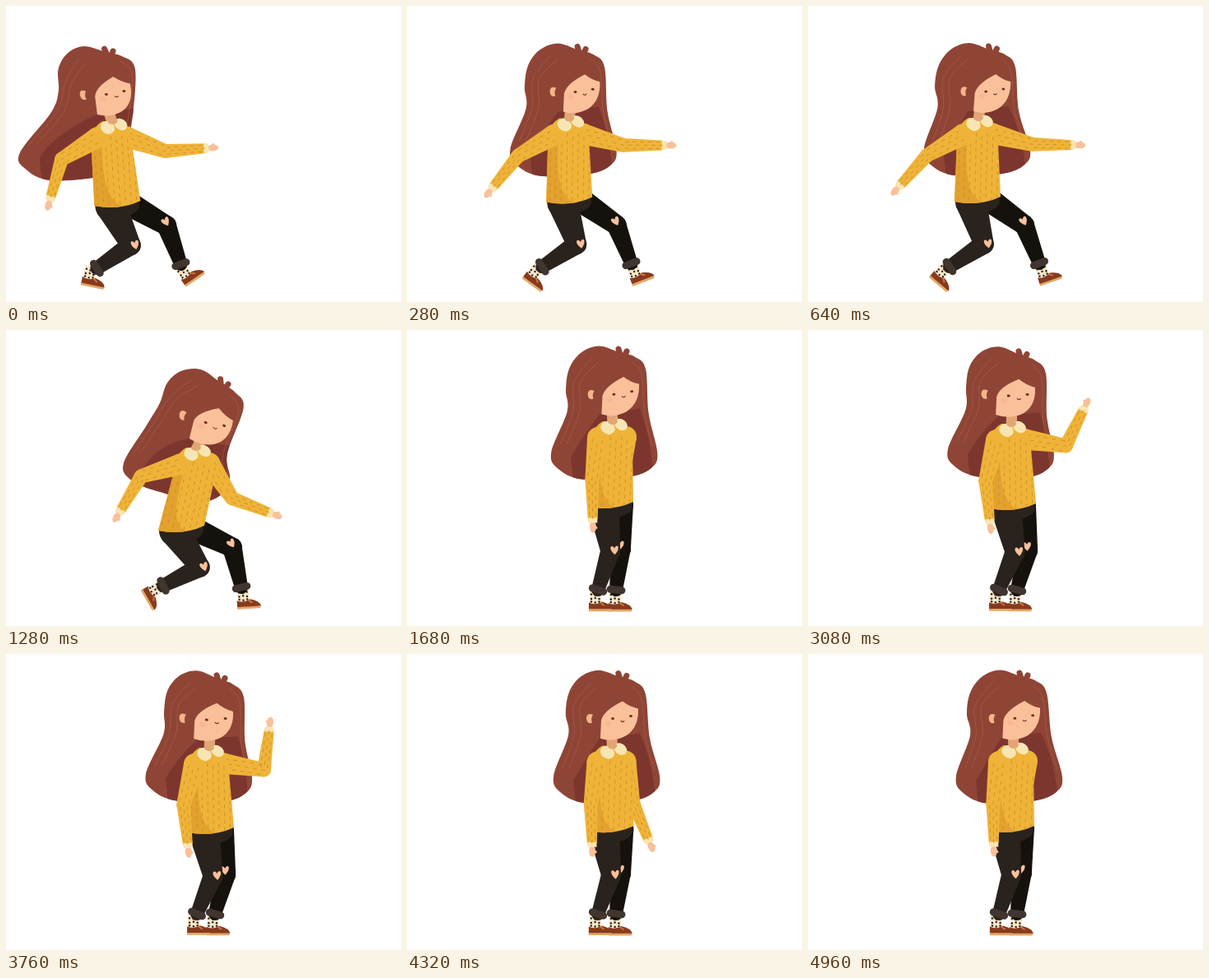
An HTML page with a canvas that plays this animation: 480 px wide and 360 px high, repeating every 5 s.

```html
<!DOCTYPE html>
<html>
<head>
<meta charset="utf-8">
<style>
  html, body { margin: 0; height: 100%; overflow: hidden; background: #fff; }
  canvas { display: block; }
</style>
</head>
<body>
<canvas id="stage" width="480" height="360"></canvas>
<script>
const ctx = document.getElementById('stage').getContext('2d');
const LOOP = 5000;
const HAIR = '#8f4536', HAIR_DARK = '#7c362e', STRAND = 'rgba(178,104,80,.6)';
const SKIN = '#fac09a', NECK = '#e2a675', CREAM = '#f7e6b4', FEATURE = '#6b3022';
const KNIT = '#efb338', KNIT_SHADE = '#e3a12e', STITCH = '#c48a26';
const NEAR_PANTS = '#2a221d', FAR_PANTS = '#15120d', CUFF = '#41352f';

// head is relative to the neck; arms are [upper, fore] angles in degrees;
// feet are [ankle x, ankle y, angle]; drag swings the hair tips sideways
const slide = {
  neck: [130, 146], hips: [135, 240], head: [2, -41], tilt: -.04, lean: .17, turn: 0, drag: -35,
  nearArm: [149, 106], farArm: [20, -4], nearFoot: [110, 319, .2], farFoot: [212, 314, -.6]
};
const skid = {
  neck: [208, 142], hips: [206, 235], head: [14, -40], tilt: 0, lean: -.03, turn: 4, drag: 0,
  nearArm: [150, 132], farArm: [15, 1], nearFoot: [172, 317, .7], farFoot: [281, 313, -.33]
};
const crouch = {
  neck: [232, 149], hips: [213, 241], head: [22, -35], tilt: .31, lean: -.2, turn: 0, drag: -30,
  nearArm: [163, 121], farArm: [57, 21], nearFoot: [191, 311, 1.05], farFoot: [286, 313, -.06]
};
const stand = {
  neck: [251, 117], hips: [247, 212], head: [10, -41], tilt: -.02, lean: 0, turn: 1, drag: 0,
  nearArm: [98, 89], farArm: [95, 100], nearFoot: [232, 316, 0], farFoot: [254, 316, 0]
};
const wave = {
  ...stand, neck: [248, 120], hips: [249, 214], head: [12, -41], tilt: .06, turn: -4, drag: -9,
  nearArm: [105, 84], farArm: [9, -78]
};

const blend = (a, b, k) => typeof a === 'number' ? a + (b - a) * k
  : Array.isArray(a) ? a.map((v, i) => blend(v, b[i], k))
  : Object.fromEntries(Object.keys(a).map(key => [key, blend(a[key], b[key], k)]));
const progress = (time, from, to) => Math.max(0, Math.min(1, (time - from) / (to - from)));
const smooth = u => u * u * (3 - 2 * u);

function poseAt(time) {
  const rise = smooth(progress(time, 1280, 1640));
  const raise = smooth(progress(time, 2280, 2640)) - smooth(progress(time, 4000, 4440));
  let pose = blend(slide, skid, 1 - (1 - progress(time, 0, 560)) ** 3);
  pose = blend(pose, crouch, progress(time, 600, 1280) ** 5);
  pose = blend(pose, stand, rise);
  pose = blend(pose, wave, raise);
  // The waving forearm and the hair are damped pendulums
  const swing = time - 3080, settle = time - 1640;
  pose.farArm[1] += raise * 14 * Math.exp(-swing / 680) * Math.cos(swing / 480 * 2 * Math.PI);
  pose.drag -= rise * 6 * Math.exp(-Math.max(0, settle) / 400) * Math.cos(settle / 250 * Math.PI);
  return pose;
}

const add = (p, x, y) => [p[0] + x, p[1] + y];
const mix = (p, q, k) => blend(p, q, k);
const polar = (p, length, degrees) => {
  const a = degrees * Math.PI / 180;
  return add(p, length * Math.cos(a), length * Math.sin(a));
};
const unit = (p, q) => {
  const d = Math.hypot(q[0] - p[0], q[1] - p[1]);
  return [(q[0] - p[0]) / d, (q[1] - p[1]) / d];
};

// Knee of a two-bone leg, bending forward
function kneeOf(hip, ankle, thigh = 54, shin = 50) {
  const [x, y] = unit(hip, ankle);
  const d = Math.hypot(ankle[0] - hip[0], ankle[1] - hip[1]);
  const along = (thigh ** 2 - shin ** 2 + d * d) / (2 * d);
  const out = Math.sqrt(Math.max(9, thigh ** 2 - along ** 2));
  return add(hip, x * along + y * out, y * along - x * out);
}

function fill(color, path) {
  ctx.fillStyle = color;
  path ? ctx.fill(path) : ctx.fill();
}

function ellipse(p, rx, ry, color, angle = 0) {
  ctx.beginPath();
  ctx.ellipse(...p, rx, ry, angle, 0, 7);
  fill(color);
}

function line(p, q, width, color, cap = 'round') {
  ctx.beginPath();
  ctx.moveTo(...p);
  ctx.lineTo(...q);
  ctx.lineWidth = width;
  ctx.lineCap = cap;
  ctx.strokeStyle = color;
  ctx.stroke();
}

// Smooth curve through points
function spline(points, closed) {
  const path = new Path2D(), n = points.length;
  const at = i => closed ? points[(i + n) % n] : points[Math.max(0, Math.min(n - 1, i))];
  path.moveTo(...points[0]);
  for (let i = 0; i < (closed ? n : n - 1); i++) {
    const [a, b, c, d] = [at(i - 1), at(i), at(i + 1), at(i + 2)];
    path.bezierCurveTo(b[0] + (c[0] - a[0]) / 6, b[1] + (c[1] - a[1]) / 6,
      c[0] - (d[0] - b[0]) / 6, c[1] - (d[1] - b[1]) / 6, ...c);
  }
  return path;
}

function taper(a, ra, b, rb, color) {
  const [x, y] = unit(a, b);
  ctx.beginPath();
  ctx.moveTo(a[0] - y * ra, a[1] + x * ra);
  ctx.lineTo(b[0] - y * rb, b[1] + x * rb);
  ctx.lineTo(b[0] + y * rb, b[1] - x * rb);
  ctx.lineTo(a[0] + y * ra, a[1] - x * ra);
  fill(color);
  ellipse(a, ra, ra, color);
  ellipse(b, rb, rb, color);
}

// Staggered stitches along a -> b
function stitches(a, b, half, rows, cols) {
  const [x, y] = unit(a, b);
  for (let r = 0; r < rows; r++) {
    for (let c = 0; c < cols; c++) {
      const side = ((c + .5) / cols * 2 - 1) * half;
      const p = add(mix(a, b, (r + .3 + c % 2 * .45) / rows), -y * side, x * side);
      line(p, add(p, x * 3.5, y * 3.5), .8, STITCH);
    }
  }
}

function drawHair(place, center, { drag, tilt }) {
  const L = add(center, drag - 81, 71 - tilt * 75), R = add(center, drag + 48, 73 - tilt * 25);
  const leftWaist = add(place(-64, 22), drag / 2, 0);
  const rightWaist = add(place(35, 26), drag / 2, 0);
  const shape = spline([
    place(-28, -57), place(-50, -49), place(-64, -30), place(-68, -4), leftWaist,
    L, add(L, 8, 20), add(L, 37, 33), add(R, -34, 29), add(R, -7, 18), R,
    rightWaist, place(29, -28), place(16, -43), place(-3, -49)
  ], true);
  fill(HAIR, shape);
  line(place(-1, -43), place(-4, -53), 7, HAIR);
  line(place(2, -42), place(6, -50), 7, HAIR);

  ctx.save();
  ctx.clip(shape);
  const top = place(-27, 26), side = place(22, 20);
  ctx.beginPath();
  ctx.moveTo(...top);
  ctx.quadraticCurveTo(L[0] + 40, L[1] - 22, L[0] + 24, L[1] + 6);
  ctx.lineTo(...add(L, 28, 45));
  ctx.lineTo(...add(R, -4, 45));
  ctx.quadraticCurveTo(R[0] - 6, R[1] - 14, ...side);
  fill(HAIR_DARK);
  ctx.lineWidth = .8;
  ctx.strokeStyle = STRAND;
  for (const d of [7, 15]) {
    ctx.stroke(spline([place(-44 + d, -46 + d * .6), place(-65 + d, -14),
      add(leftWaist, d, 0), add(L, d + 4, -10)]));
  }
  ctx.stroke(spline([place(12, -38), place(24, -22), add(rightWaist, -5, 0), add(R, -6, -8)]));
  ctx.restore();
}

function drawFoot(p, angle) {
  ctx.save();
  ctx.translate(...p);
  ctx.rotate(angle);
  ctx.fillStyle = '#f5e6c8';
  ctx.fillRect(-7, -8, 14, 17);
  for (let i = 0; i < 9; i++) {
    ellipse([-5 + i % 3 * 4.8, -4 + (i / 3 | 0) * 4.5 + i % 2], 1.2, 1.2, '#2a1c18');
  }
  fill('#873a1d', new Path2D('M-8 6Q-1 10 8 5Q20 8 21 14Q5 16-8 14Z'));
  line([6, 6], [10, 9], 2, '#c9773c');
  line([-7, 15.2], [19, 15.2], 2.8, '#e3a765');
  ctx.restore();
}

function drawLeg(hip, [ax, ay, angle], hipRadius, color, patch) {
  const ankle = [ax, ay], knee = kneeOf(hip, ankle), [x, y] = unit(knee, ankle);
  drawFoot(add(ankle, x * 10, y * 10), angle);
  taper(hip, hipRadius, knee, 12, color);
  taper(knee, 12, ankle, 8, color);
  line(add(ankle, -y * 7, x * 7), add(ankle, y * 7, -x * 7), 9, CUFF);
  ctx.save();
  ctx.translate(...add(knee, ...patch));
  ctx.rotate(-Math.atan2(knee[0] - hip[0], knee[1] - hip[1]) / 2);
  fill(SKIN, new Path2D('M0 6Q-6 0-4.5-4Q-2-6 0-2Q2-6 4.5-4Q6 0 0 6Z'));
  ctx.restore();
}

function drawArm(shoulder, [upper, fore]) {
  const elbow = polar(shoulder, 51, upper), wrist = polar(elbow, 47, fore);
  const palm = polar(wrist, 11, fore);
  ellipse(palm, 7, 4, SKIN, fore * Math.PI / 180);
  line(polar(wrist, 8, fore), polar(palm, 4.5, fore - 75), 2.6, SKIN);
  taper(shoulder, 13, elbow, 8.5, KNIT);
  taper(elbow, 8.5, wrist, 6, KNIT);
  line(wrist, polar(wrist, 6, fore), 11, CREAM, 'butt');
  stitches(shoulder, elbow, 9, 5, 3);
  stitches(elbow, wrist, 6, 5, 3);
}

function drawTorso(neck, near, far) {
  const hem = mix(near, far, .5), shape = new Path2D();
  shape.moveTo(...add(neck, -13, -6));
  shape.quadraticCurveTo(...add(neck, -26, 1), ...add(neck, -27, 20));
  shape.lineTo(...near);
  shape.quadraticCurveTo(...add(hem, 2, 9), ...far);
  shape.lineTo(...add(neck, 23, 24));
  shape.quadraticCurveTo(...add(neck, 22, 3), ...add(neck, 10, -4));
  fill(KNIT, shape);
  ctx.save();
  ctx.clip(shape);
  ctx.beginPath();
  ctx.moveTo(...add(neck, -14, 18));
  ctx.quadraticCurveTo(...mix(near, far, .15), ...add(mix(near, far, .7), 0, 6));
  ctx.lineTo(...add(near, -10, 9));
  ctx.lineTo(...add(neck, -40, 18));
  fill(KNIT_SHADE);
  stitches(add(neck, 0, 10), hem, 27, 9, 8);
  ctx.restore();
}

const faceShape = new Path2D('M1-19Q-22-8-25 4L-26 26Q-10 31 5 23Q21 13 20-10Q10-12 1-19Z');
const earShape = new Path2D('M-35-3Q-43-6-43 2Q-42 9-36 7Q-38 2-35-3Z');

function drawFace([x, y], { tilt, lean, turn }) {
  ctx.save();
  ctx.transform(1, tilt, lean, 1, x, y);
  const squash = 1 - turn * .01;
  ctx.transform(squash, 0, 0, 1, turn + 20 - 20 * squash, 0);
  fill(SKIN, faceShape);
  fill('#f3b587', earShape);
  ellipse([-16, 8], 4, 3, 'rgba(240,140,115,.15)');
  for (const side of [-1, 1]) ellipse([side * 11, .5 - side * 1.5], 2, 1.5, FEATURE);
  ctx.beginPath();
  ctx.arc(1, 3.5, 2.3, .4, 2.75);
  ctx.lineWidth = 1.1;
  ctx.strokeStyle = FEATURE;
  ctx.stroke();
  ctx.restore();
}

function draw(time) {
  const pose = poseAt(time), { neck, hips, tilt, lean } = pose;
  const center = add(neck, ...pose.head);
  const place = (x, y) => add(center, x + lean * y, tilt * x + y);
  const near = add(hips, -28, 3), far = add(hips, 28, -3);

  ctx.fillStyle = '#fff';
  ctx.fillRect(0, 0, 480, 360);
  drawHair(place, center, pose);
  drawArm(add(neck, 15, 13), pose.farArm);
  drawLeg(add(far, -15, 3), pose.farFoot, 15, FAR_PANTS, [-1, -5]);
  drawLeg(add(near, 20, 0), pose.nearFoot, 19, NEAR_PANTS, [5, -1]);
  ellipse(add(hips, 0, 2), 27, 15, NEAR_PANTS);
  drawTorso(neck, near, far);
  drawArm(add(neck, -19, 14), pose.nearArm);
  line(place(-12, 20), add(neck, -1, -3), 13, NECK, 'butt');
  ellipse(add(neck, -7, 2), 9, 7.5, CREAM, .5);
  ellipse(add(neck, 9, -2), 8.5, 6.5, CREAM, .6);
  ellipse(add(neck, -1, -6), 6, 4, NECK);
  drawFace(center, pose);
}

function tick() {
  draw(performance.now() % LOOP);
  requestAnimationFrame(tick);
}
tick();
</script>
</body>
</html>
```
